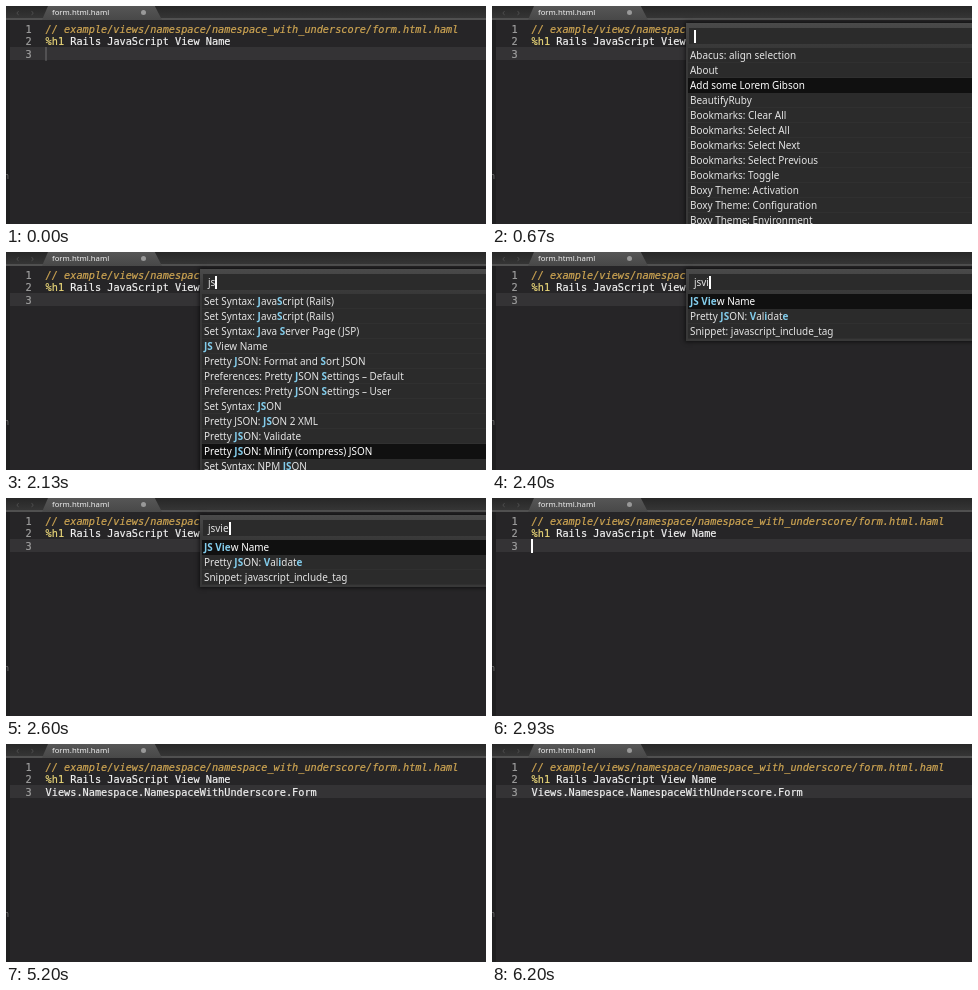
These frames come from a looping animation (480 px wide and 218 px high, 6.34 s). An HTML page:

```html
<!DOCTYPE html>
<html lang="en">
<head>
<meta charset="utf-8">
<style>
html, body { margin: 0; width: 100%; height: 100%; overflow: hidden; background: #262527; }
body { position: relative; }
div, i { position: absolute; white-space: pre; }
.code { font: 10.24px/12.3px "DejaVu Sans Mono", monospace; left: 39.6px; color: #f2f2f2; -webkit-text-stroke: .2px; }
.ui { font: 500 9.95px/15px "Noto Sans", sans-serif; color: #e4e4e4; }
.caret { width: 2px; background: #fff; }
#tabs { left: 0; top: 0; width: 480px; height: 12px; background: linear-gradient(#272727, #353535); border-bottom: 2px solid #505050; }
#tab { left: 36px; top: 0; width: 120px; height: 14px; background: linear-gradient(#565656, #484848); clip-path: polygon(5% 0, 94% 0, 100% 100%, 0 100%); }
#name { left: 46px; top: 0; font-size: 7.75px; line-height: 12.5px; color: #f0f0f0; }
#dot { left: 135px; top: 4px; width: 5px; height: 5px; border-radius: 50%; background: #999; }
#side { left: 0; top: 14px; width: 4px; height: 204px; background: #1f1f20; overflow: hidden; }
#row { left: 4px; top: 41px; width: 476px; height: 13px; background: #343335; }
#nums { left: 19.6px; color: #a0a0a0; }
#palette { left: 194px; top: 17px; width: 290px; background: linear-gradient(#4a4a4a, #383838 24px); box-shadow: 0 0 4px 1px #0009; overflow: hidden; }
#field { left: 3px; top: 5px; width: 290px; height: 16px; background: #2b2b2b; }
#query { left: 8px; top: 6px; }
#list { left: 2px; top: 25px; width: 290px; background: #2b2b2b; }
#list div { position: static; height: 15px; line-height: 14.6px; padding-left: 2px; box-sizing: border-box; border-bottom: 1px solid #303030; }
#list .on { background: #101010; color: #fff; border-color: #101010; }
b { color: #83cdec; font-weight: 600; }
</style>
</head>
<body>
<div id="tabs"></div>
<div class="ui" style="left:10px;top:-2px;font-size:11px;color:#4c4c4c">‹    ›</div>
<div id="tab"></div>
<div id="name" class="ui">form.html.haml</div>
<i id="dot"></i>
<div id="side"><div class="ui" style="left:-2px;top:148px;font-size:8px;color:#777">n</div></div>
<div id="row"></div>
<div id="nums" class="code" style="top:17px">1
2
3</div>
<div class="code" style="top:17px;font-style:oblique;color:#cfa653">// example/views/namespace/namespace_with_underscore/form.html.haml</div>
<div class="code" style="top:29.3px"><span style="color:#e8d578">%h1</span> Rails JavaScript View Name</div>
<div id="result" class="code" style="top:41.6px">Views.Namespace.NamespaceWithUnderscore.Form</div>
<i id="caret" class="caret" style="top:41px;height:14px"></i>
<div id="palette">
  <div id="field"></div>
  <div id="query" class="ui"></div>
  <i id="queryCaret" class="caret" style="top:7px;height:13px"></i>
  <div id="list" class="ui"></div>
</div>
<script>
const LOOP = 6340, OPEN = 130, CLOSE = 2800, INSERT = 3000;
const keys = [[1930, 'j'], [2070, 'js'], [2270, 'jsv'], [2400, 'jsvi'], [2530, 'jsvie']];

// Square brackets mark the matched letters.
const lists = {
  all: { selected: 2, rows: ['Abacus: align selection', 'About', 'Add some Lorem Gibson', 'BeautifyRuby',
    'Bookmarks: Clear All', 'Bookmarks: Select All', 'Bookmarks: Select Next', 'Bookmarks: Select Previous',
    'Bookmarks: Toggle', 'Boxy Theme: Activation', 'Boxy Theme: Configuration', 'Boxy Theme: Environment'] },
  js: { selected: 10, rows: ['Set Syntax: [J]ava[S]cript (Rails)', 'Set Syntax: [J]ava[S]cript (Rails)',
    'Set Syntax: [J]ava [S]erver Page (JSP)', '[JS] View Name', 'Pretty [J]SON: Format and [S]ort JSON',
    'Preferences: Pretty [J]SON [S]ettings – Default', 'Preferences: Pretty [J]SON [S]ettings – User',
    'Set Syntax: [JS]ON', 'Pretty JSON: [JS]ON 2 XML', 'Pretty [JS]ON: Validate',
    'Pretty [JS]ON: Minify (compress) JSON', 'Set Syntax: NPM [JS]ON'] },
  view: { selected: 0, rows: ['[JS] [Vie]w Name', 'Pretty [JS]ON: [V]al[i]dat[e]', 'Snippet: javascript_include_tag'] }
};

const el = id => document.getElementById(id);
const show = (id, visible) => el(id).style.visibility = visible ? 'inherit' : 'hidden';
const clamp = x => Math.max(0, Math.min(1, x));

// Solid after a reset, then fading out and in once per second.
function blink(t, reset) {
  const since = t - reset - 870;
  if (since < 0) return 1;
  const p = since % 1000;
  return p < 500 ? clamp(1 - p / 260) : clamp((p - 650) / 150);
}

let shownList;
function fillList(name) {
  if (name === shownList) return;
  shownList = name;
  const { rows, selected } = lists[name];
  el('list').innerHTML = rows.map((text, i) =>
    `<div class="${i === selected ? 'on' : ''}">${text.replace(/\[/g, '<b>').replace(/]/g, '</b>')}</div>`).join('');
  el('palette').style.height = (rows.length > 3 ? 201 : 72) + 'px';
}

function draw(t) {
  const open = t >= OPEN && t < CLOSE, done = t >= INSERT;
  show('palette', open);
  show('result', done);

  const [pressed, query] = keys.filter(k => k[0] <= t).pop() || [OPEN, ''];
  fillList(query.length > 2 ? 'view' : query ? 'js' : 'all');
  el('query').textContent = query;
  el('queryCaret').style.left = 8 + el('query').offsetWidth + 'px';
  el('queryCaret').style.opacity = blink(t, pressed);

  el('caret').style.left = done ? 40 + el('result').offsetWidth + 'px' : '39px';
  el('caret').style.opacity = open ? 0 : t < OPEN ? clamp(0.15 - t / 800) : blink(t, done ? INSERT : CLOSE);
}

function frame() {
  draw(performance.now() % LOOP);
  requestAnimationFrame(frame);
}
frame();
</script>
</body>
</html>
```
